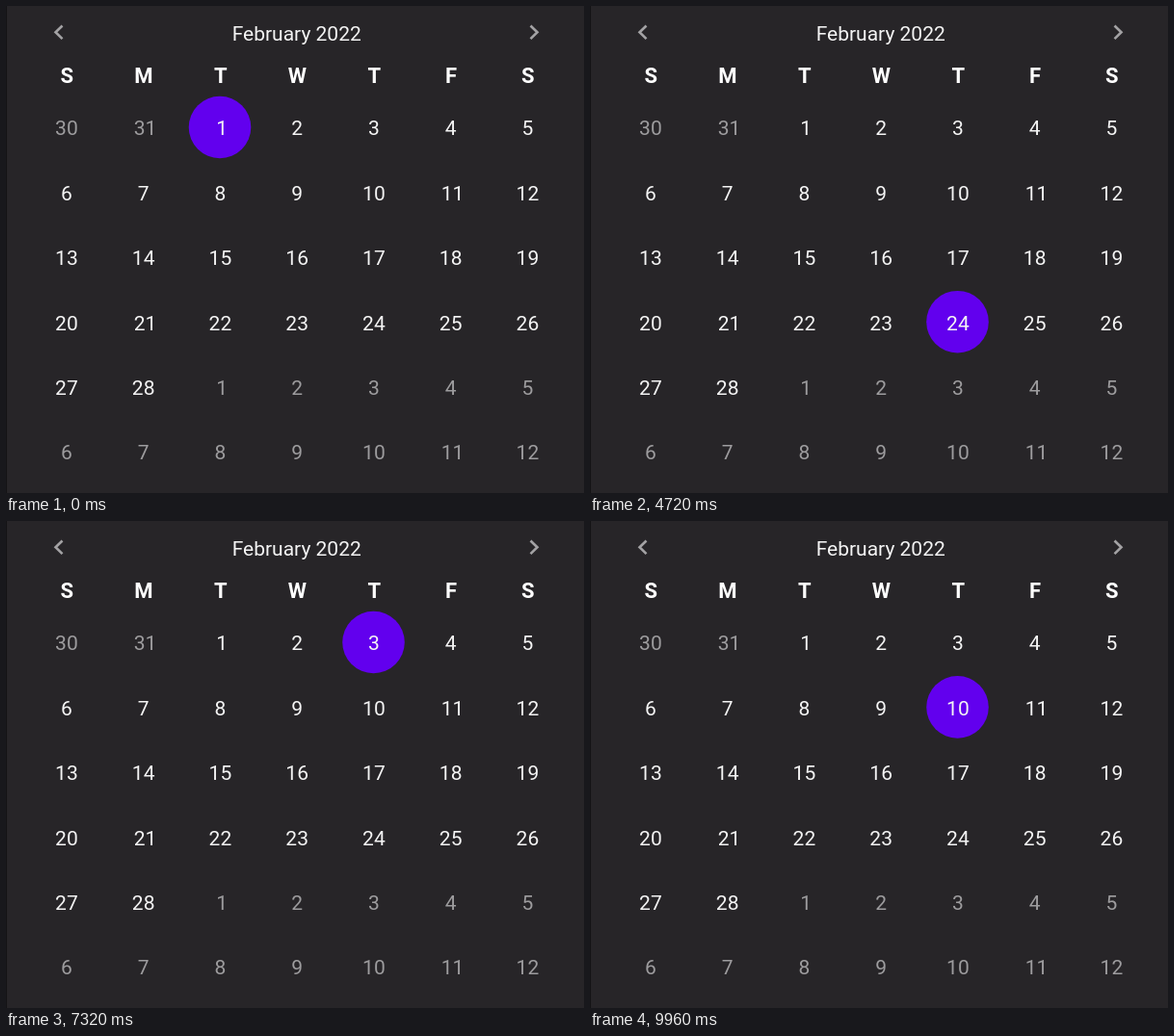
An HTML page that plays this animation: 600 by 506 pixels, repeating every 10000 ms.

```html
<!DOCTYPE html>
<html lang="en">
<head>
<meta charset="utf-8">
<title>Calendar selection</title>
<style>
  html, body { margin: 0; width: 100%; height: 100%; overflow: hidden; background: #272528; }
  svg { display: block; }
  text { font: 21px Roboto, sans-serif; text-anchor: middle; fill: #f4f4f4; }
  .head { font-weight: 700; font-size: 22px; fill: #fff; }
  .other { fill: #9d9c9e; }
  .arrow { fill: none; stroke: #a3a2a4; stroke-width: 2.6; }
  .pick { fill: #6200ee; }
</style>
</head>
<body>
<svg id="stage" width="600" height="506" viewBox="0 0 600 506">
  <clipPath id="reveal"><circle id="hole"/></clipPath>
  <rect width="600" height="506" fill="#272528"/>
  <rect width="1" height="506" fill="#141315"/>
  <g id="picks"></g>
  <circle id="press" r="32.3"/>
  <g id="labels">
    <path class="arrow" d="M58.5 20.5 51.5 27.3 58.5 34.1M544.5 20.5 551.5 27.3 544.5 34.1"/>
  </g>
</svg>
<script>
const $ = id => document.getElementById(id);
const LOOP = 10000, FADE = 400, SPEED = 1.38, R = 32.3;
const colX = c => 62.5 + 79.75 * c;
const rowY = r => 126 + 67.4 * r;
const clamp = v => Math.max(0, Math.min(1, v));

function add(parent, tag, attrs, text = '') {
  const el = document.createElementNS('http://www.w3.org/2000/svg', tag);
  for (const k in attrs) el.setAttribute(k, attrs[k]);
  el.textContent = text;
  return parent.appendChild(el);
}

// Rounded bar covering columns a to b of one row
function bar(row, a, b = a) {
  const y = rowY(row), arc = `A${R} ${R} 0 0 1 `;
  return `M${colX(a)} ${y - R}H${colX(b)}${arc}${colX(b)} ${y + R}H${colX(a)}${arc}${colX(a)} ${y - R}Z`;
}
const month = 'M222 93.8H542a32 32 0 0 1 32 32V331a32 32 0 0 1-32 32H142' +
  'A32.5 32.5 0 0 1 142 428H62a32 32 0 0 1-32-32V190a32 32 0 0 1 32-32H222A32.1 32.1 0 0 1 222 93.8Z';

// Selections in order; those with a centre grow from it, the others cross-fade
const steps = [
  { at: -FADE, d: bar(0, 2) },
  { at: 900, d: bar(0, 3), press: [800, 3, 0] },
  { at: 2120, d: bar(0, 4), press: [2080, 4, 0] },
  { at: 3400, d: bar(3, 4), press: [3280, 4, 3] },
  { at: 4730, d: bar(3, 0, 6), from: [4, 3] },
  { at: 6690, d: bar(0, 4), press: [6600, 4, 0] },
  { at: 7760, d: month, from: [4, 0] },
  { at: 9120, d: bar(1, 4), press: [9000, 4, 1], dark: true }
];
for (const s of steps) {
  s.el = add($('picks'), 'path', { class: 'pick', d: s.d });
  if (s.from) s.el.setAttribute('clip-path', 'url(#reveal)');
}

const labels = $('labels');
add(labels, 'text', { x: 301.7, y: 36 }, 'February 2022');
[...'SMTWTFS'].forEach((d, c) => add(labels, 'text', { class: 'head', x: colX(c) + .7, y: 80 }, d));
for (let i = 0; i < 42; i++) {
  const date = new Date(2022, 0, 30 + i), n = date.getDate();
  const nudge = n % 10 === 1 ? 2.2 : .4;
  add(labels, 'text', {
    class: date.getMonth() === 1 ? '' : 'other',
    x: colX(i % 7) + nudge,
    y: rowY(Math.floor(i / 7)) + 8.4
  }, n);
}

function draw(t) {
  $('press').setAttribute('opacity', 0);
  steps.forEach((s, i) => {
    const next = steps[i + 1];
    let alpha = s.from ? +(t >= s.at) : clamp((t - s.at) / FADE);
    if (next) {
      const gone = clamp((t - next.at) / FADE);
      alpha *= next.from ? +(gone < 1) : 1 - gone;
    }
    s.el.setAttribute('opacity', alpha);
    if (s.from && alpha) {
      const hole = $('hole');
      hole.setAttribute('cx', colX(s.from[0]));
      hole.setAttribute('cy', rowY(s.from[1]));
      hole.setAttribute('r', (t - s.at) * SPEED);
    }
    if (s.press && t >= s.press[0] && t < s.at + 60) {
      const press = $('press');
      press.setAttribute('cx', colX(s.press[1]));
      press.setAttribute('cy', rowY(s.press[2]));
      press.setAttribute('fill', s.dark ? '#000' : '#fff');
      press.setAttribute('opacity', (s.dark ? .17 : .055) * (1 - clamp((t - s.at) / 30)));
    }
  });
}

const start = performance.now();
(function tick() {
  draw((performance.now() - start) % LOOP);
  requestAnimationFrame(tick);
})();
</script>
</body>
</html>
```
